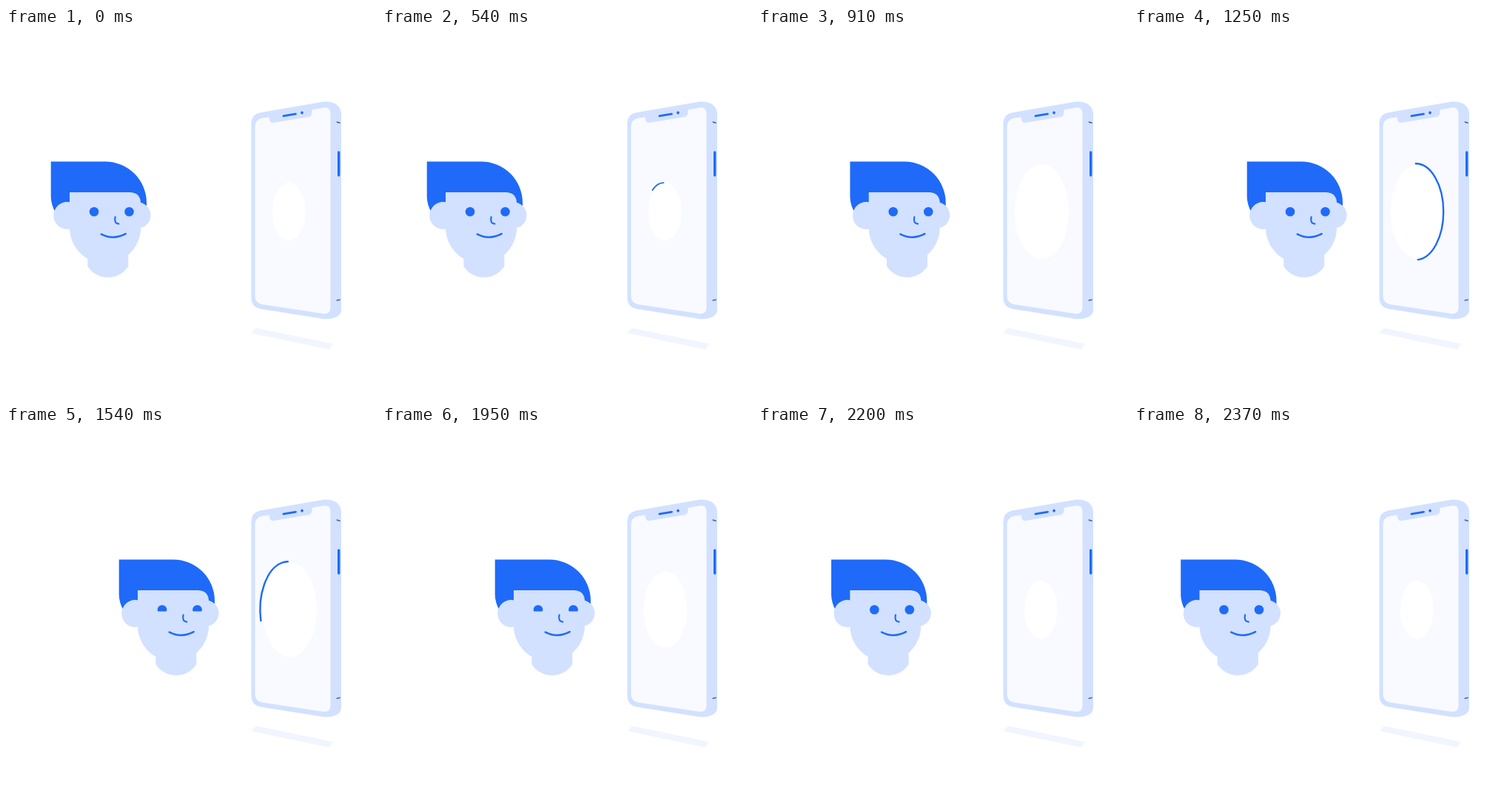
An HTML page with a canvas that plays this animation: 500 px wide and 500 px high, repeating every 2.41 s.

```html
<!DOCTYPE html>
<html lang="en">
<head>
<meta charset="utf-8">
<title>Face scan</title>
<style>
  html, body { margin: 0; width: 100%; height: 100%; overflow: hidden; background: #fff; }
  canvas { display: block; width: 500px; height: 500px; }
</style>
</head>
<body>
<canvas id="stage" width="500" height="500"></canvas>
<script>
const ctx = document.getElementById('stage').getContext('2d');
const BLUE = '#1f6af8', PALE = '#d2e1ff', SCREEN = '#f8faff', SHADOW = '#f0f5ff';
const LOOP = 2410, STEP = 1000 / 24, TAU = Math.PI * 2;

const clamp = v => Math.min(1, Math.max(0, v));
const ramp = (v, a, b) => clamp((v - a) / (b - a));
const mix = (a, b, p) => a + (b - a) * p;

function fill(d, color) {
  ctx.fillStyle = color;
  ctx.fill(new Path2D(d));
}

function stroke(d, width, color = BLUE) {
  ctx.strokeStyle = color;
  ctx.lineWidth = width;
  ctx.lineCap = 'round';
  ctx.stroke(new Path2D(d));
}

function oval(x, y, rx, ry, color) {
  ctx.fillStyle = color;
  ctx.beginPath();
  ctx.ellipse(x, y, rx, ry, 0, 0, TAU);
  ctx.fill();
}

function drawPhone() {
  fill('M332 411 L337 406.5 Q338.5 405.5 341 406 L441 426.5 Q442 427 441.5 428 L438 433 Q437 434.3 435 434 L334 412.8 Q332 412.3 332 411Z', SHADOW);
  fill('M331.5 130 Q331.5 116.5 344 114.2 L428 99.8 Q434 98.8 440 100.5 Q453 104 453 117 L453 380 Q453 388.5 445 391 Q437 394.3 429 393 L345 379.8 Q331.5 377.5 331.5 364Z', PALE);
  fill('M336.5 134 Q336.5 123.5 346 121.8 L355.5 120.2 L356.3 124 Q357.2 128.6 361.5 127.9 L408.5 120.2 Q413 119.4 413.3 115 L413.7 110.4 L429 107.7 Q438.5 106.3 438.5 116 L438.5 377 Q438.5 387.4 428.5 385.9 L346 373.4 Q336.5 371.8 336.5 362Z', SCREEN);
  stroke('M375 118.9 L391.5 116.2', 2.8);
  oval(400, 114.5, 1.8, 1.9, BLUE);
  stroke('M449.7 168 V199', 3.4);
  stroke('M447.3 127 L451 128.3 M447.3 368 L451 367.2', 1.6, '#3563b8');
}

function drawHead(dx, squint) {
  ctx.save();
  ctx.translate(dx, 0);
  fill('M60.7 180.4 H134 A56 56 0 0 1 190 236.4 V250 H67 Q60.7 238 60.7 228Z', BLUE);
  oval(82.5, 253.5, 18.3, 18.5, PALE);
  oval(177.8, 253, 17.7, 17.7, PALE);
  fill('M86 222 H168 Q182 223 182 237 V270 A48 48 0 0 1 86 270Z', PALE);
  fill('M110.3 290 H165.3 V322 A32.6 32.6 0 0 1 110.3 322Z', PALE);

  ctx.save();
  ctx.beginPath();
  ctx.rect(100, 238, 90, mix(17, 12.6, squint));
  ctx.clip();
  oval(119, 248.2, 6.3, 6.3, BLUE);
  oval(166.5, 248.2, 6.3, 6.3, BLUE);
  ctx.restore();

  stroke('M147.6 255.3 Q145.6 264.3 152.3 264.6', 2.2);
  stroke('M128.8 278.7 Q145 287 161.6 278.2', 2.6);
  ctx.restore();
}

// Ring drawn clockwise from the top, then erased the same way.
function drawRing(k, lag, x, rx, ry, width) {
  const span = 8.2, from = clamp((k - lag) / span), to = clamp(k / span);
  if (to <= from) return;
  ctx.strokeStyle = BLUE;
  ctx.lineWidth = width;
  ctx.lineCap = 'round';
  ctx.beginPath();
  ctx.ellipse(x, 248.3, rx, ry, 0, (from - 0.25) * TAU, (to - 0.25) * TAU);
  ctx.stroke();
}

function draw(n) {
  ctx.fillStyle = '#fff';
  ctx.fillRect(0, 0, 500, 500);
  drawPhone();

  const grow = ramp(n, 13, 15) - ramp(n, 46, 48);
  oval(mix(382.3, 383.4, grow), 248.2, mix(22.4, 36.6, grow), mix(39.2, 64, grow), '#fff');
  drawRing(n, 5.75, 380.5, 22.6, 39.2, 1.8);
  drawRing(n - 26, 5.15, 380.8, 37.4, 65, 2.4);

  const near = ramp(n, 13, 26) - ramp(n, 47, 57.28);
  const squint = ramp(n, 33, 35) - ramp(n, 47, 49);
  drawHead(92 * near, squint);
}

// The motion runs at 24 steps per second, with step times cut to 10 ms.
function stepAt(t) {
  return Math.ceil((Math.floor(t / 10) * 10 + 10) / STEP) - 1;
}

const start = performance.now();
function tick() {
  draw(stepAt((performance.now() - start) % LOOP));
  requestAnimationFrame(tick);
}
tick();
</script>
</body>
</html>
```
